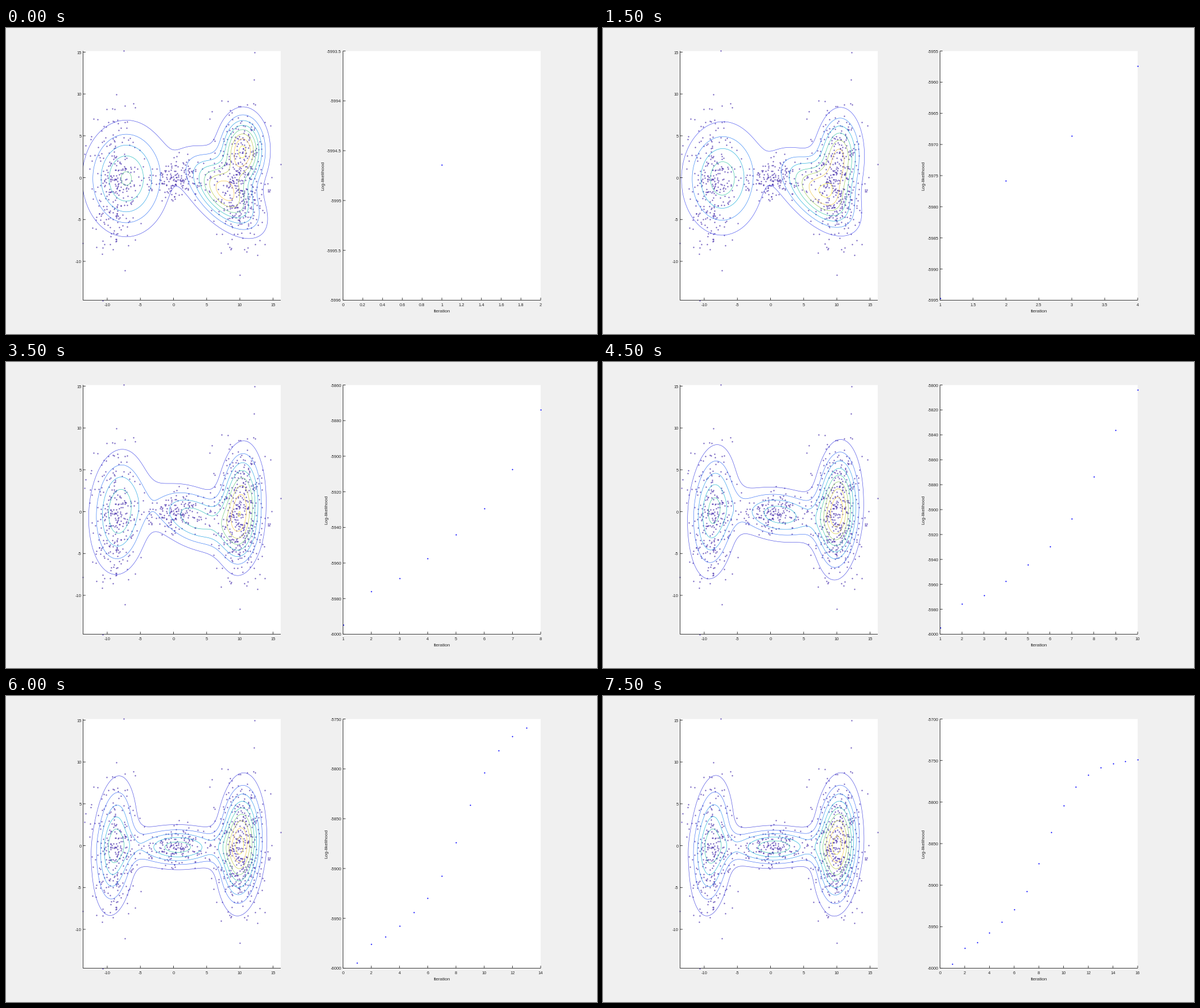
Animation, 1039 px wide and 539 px high, one loop 8 s. Source, as a matplotlib script:

```python
import math
import numpy as np
import matplotlib.pyplot as plt
from matplotlib.animation import FuncAnimation
from matplotlib.colors import LinearSegmentedColormap
from matplotlib.patches import Rectangle

W, H, DPI = 1039, 539, 64
PT = 72 / DPI  # points per pixel
STEPS, INTERVAL = 16, 500
INK = "#262626"
TOP, BOTTOM = 40.5, 479.5
LEFT_BOX = (135.5, 483.0)
RIGHT_BOX = (592.5, 940.0)
X0, Y0, KX, KY = 294.5, 263.6, 11.66, 14.74  # data to pixels, left plot

plt.rcParams["font.family"] = "Liberation Sans"

parula = LinearSegmentedColormap.from_list("parula", [
    (0.242, 0.150, 0.660), (0.281, 0.323, 0.958), (0.179, 0.529, 0.968),
    (0.069, 0.695, 0.839), (0.216, 0.784, 0.592), (0.672, 0.779, 0.223),
    (0.997, 0.766, 0.220), (0.977, 0.984, 0.081)])


def ease(step, mid):
    """S-curve from 0 to 1, half way at mid."""
    return 1 / (1 + math.exp(-0.7 * (step - mid)))


def blend(a, b, t):
    return a + (b - a) * t


class Component:
    """Gaussian drifting from start to end: weight, mean x, y, sd x, y, rho.

    Weight, mean and sd x follow one S-curve, sd y and rho another.
    """

    def __init__(self, start, end, place_mid, shape_mid):
        self.start, self.end = start, end
        self.mids = [place_mid] * 4 + [shape_mid] * 2

    def at(self, step):
        return [blend(a, b, ease(step, m))
                for a, b, m in zip(self.start, self.end, self.mids)]


LEFT = Component((0.43, -7.1, -0.1, 3.70, 3.85, 0.0),
                 (0.30, -8.92, 0.0, 1.87, 4.60, 0.2), 6.4, 7)
MIDDLE = Component((0.32, 7.6, -1.8, 3.35, 2.78, -0.58),
                   (0.24, 0.5, -0.15, 4.50, 1.37, 0.03), 6.3, 8.2)
# weight of the last one is what the others leave over
RIGHT = Component((0, 10.45, 3.4, 2.05, 2.40, 0.0),
                  (0, 10.1, 0.14, 1.89, 4.10, 0.12), 3.9, 3.2)

GX, GY = np.meshgrid(np.linspace(*LEFT_BOX, 200), np.linspace(TOP, BOTTOM, 250))
DX, DY = (GX - X0) / KX, (Y0 - GY) / KY


def density(step):
    parts = [c.at(step) for c in (LEFT, MIDDLE, RIGHT)]
    parts[2][0] = 1 - parts[0][0] - parts[1][0]
    z = np.zeros_like(DX)
    for w, mx, my, sx, sy, rho in parts:
        u, v, q = (DX - mx) / sx, (DY - my) / sy, 1 - rho * rho
        z += (w / (2 * math.pi * sx * sy * math.sqrt(q))
              * np.exp(-(u * u - 2 * rho * u * v + v * v) / (2 * q)))
    return z


def level_gap(step):
    return 1e-3 * np.interp(step, (0, 3, 5, 7), (0.94, 1.06, 0.86, 1.07))


def loglik(n):
    """Quick first gain, slow shoulder, then a steep rise that levels off."""
    gap = 232 * (1 + math.exp(0.8 * (n - 7.65))) ** -0.69
    gap += 17.2 * math.exp(-3 * (n - 1))
    gap -= 17 * math.exp(-((n - 5.1) / 2.1) ** 2)
    return -5746.6 - gap


def sample_points():
    rng = np.random.default_rng(7)
    strays = [(-7.5, 15.14), (12.25, 14.95), (12.1, 11.7), (16.17, 1.6),
              (-13.64, -7.85), (-10.65, -14.65), (10, -11.65), (-7.3, -11.1)]
    parts = [np.array(strays)]
    for n, mx, my, sx, sy in ((285, -8.6, 0, 1.85, 4.4),
                              (190, 0.5, -0.1, 2.5, 1.25),
                              (445, 10.1, 0, 1.8, 3.9)):
        u, v = rng.standard_normal((2, n))
        ok = (np.abs(u) < 2.7) & (np.abs(v) < 2.5)
        parts.append(np.column_stack((mx + sx * u, my + sy * v))[ok])
    return np.vstack(parts)


POINTS = sample_points()


def nice_ticks(lo, hi):
    """Smallest round step that covers lo..hi with at most 11 ticks."""
    for step in (0.1, 0.2, 0.5, 1, 2, 5, 10, 20, 50, 100):
        a = math.floor(round(lo / step, 6))
        b = math.ceil(round(hi / step, 6))
        if b - a <= 10:
            return [round(i * step, 6) for i in range(a, b + 1)]


fig = plt.figure(figsize=(W / DPI, H / DPI), dpi=DPI, facecolor="#f0f0f0")
ax = fig.add_axes([0, 0, 1, 1])


def line(xs, ys):
    ax.plot(xs, ys, color=INK, lw=0.9 * PT, solid_capstyle="butt",
            solid_joinstyle="miter", snap=False, zorder=5)


def text(x, y, s, size=7.5, **kw):
    ax.text(x, y, s, fontsize=size * PT, color=INK, **kw)


def frame_box(box, xticks, yticks, to_x, to_y):
    l, r = box
    ax.add_patch(Rectangle((l, TOP), r - l, BOTTOM - TOP, fc="white", lw=0,
                           snap=False, zorder=0))
    line([l, l, r], [TOP, BOTTOM, BOTTOM])
    for t in xticks:
        x = to_x(t)
        line([x, x], [BOTTOM, BOTTOM - 4.4])
        text(x, 490, f"{t:.10g}", ha="center", va="baseline")
    for t in yticks:
        y = to_y(t)
        line([l, l + 4.4], [y, y])
        text(l - 3, y + 3, f"{t:.10g}", ha="right", va="baseline")


def dots(x, y, color, size, alpha=1):
    ax.scatter(x, y, s=(size * PT) ** 2, color=color, alpha=alpha, lw=0,
               clip_on=False, zorder=3)


def draw_mixture(step):
    def to_x(v):
        return X0 + KX * v

    def to_y(v):
        return Y0 - KY * v

    frame_box(LEFT_BOX, range(-10, 16, 5), range(-10, 16, 5), to_x, to_y)
    dots(to_x(POINTS[:, 0]), to_y(POINTS[:, 1]), parula(0.0), 2.4, 0.7)
    z = density(step) / level_gap(step)
    levels = np.arange(1, math.floor(z.max()) + 1)
    ax.contour(GX, GY, z, levels=levels, colors=parula(levels / z.max()),
               linewidths=0.65 * PT, zorder=4)


def draw_loglik(step):
    n = step + 1
    values = [loglik(i) for i in range(1, n + 1)]
    if n == 1:
        xt, yt = nice_ticks(0, 2), nice_ticks(-5996, -5993.5)
    else:
        xt, yt = nice_ticks(1, n), nice_ticks(values[0], values[-1])
    l, r = RIGHT_BOX

    def to_x(v):
        return l + (r - l) * (v - xt[0]) / (xt[-1] - xt[0])

    def to_y(v):
        return BOTTOM - (BOTTOM - TOP) * (v - yt[0]) / (yt[-1] - yt[0])

    frame_box(RIGHT_BOX, xt, yt, to_x, to_y)
    dots([to_x(i) for i in range(1, n + 1)], [to_y(v) for v in values],
         (0, 0, 1), 2.1)
    text((l + r) / 2, 500.6, "Iteration", 8.1, ha="center", va="baseline")
    text(558 if n == 1 else 564, 260, "Log-likelihood", 8.2, rotation=90,
         ha="center", va="center")


def draw(step):
    ax.clear()
    ax.axis("off")
    draw_mixture(step)
    draw_loglik(step)
    ax.set_xlim(0, W)
    ax.set_ylim(H, 0)
    return []


anim = FuncAnimation(fig, draw, frames=STEPS, interval=INTERVAL,
                     init_func=lambda: draw(0), repeat=True, repeat_delay=0)
plt.show()
```
